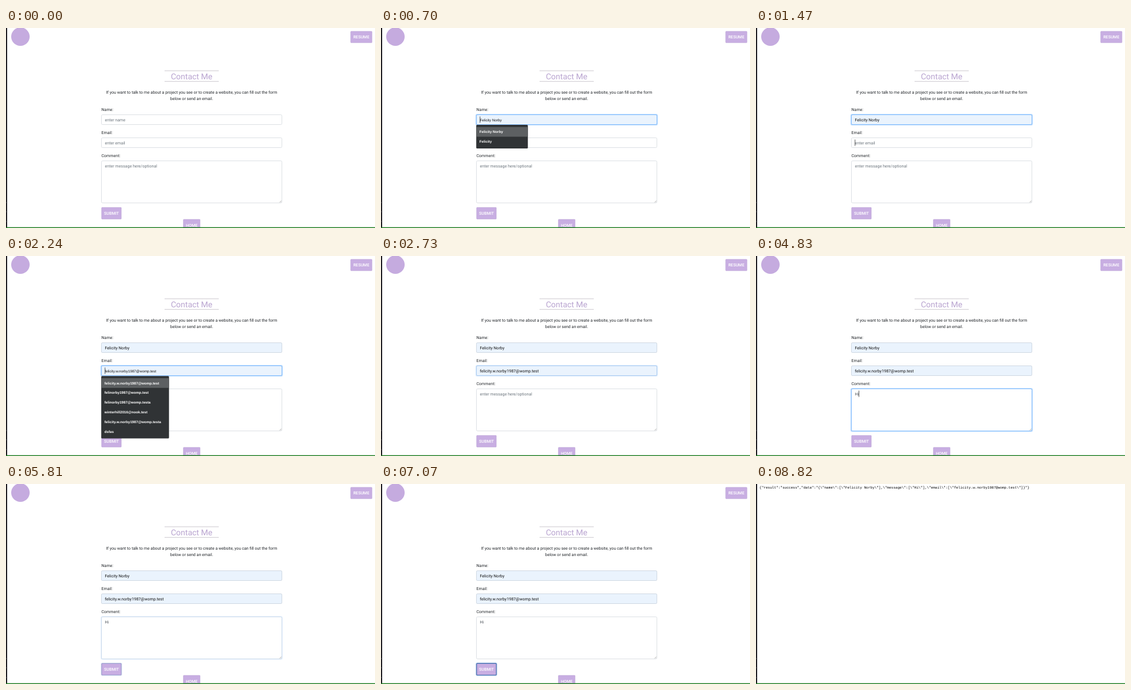
An HTML page for the animation above (9520 ms loop, 640x347 px).

```html
<!DOCTYPE html>
<html lang="en">
<head>
<meta charset="utf-8">
<title>Contact form</title>
<style>
  html, body { margin: 0; width: 100%; height: 100%; overflow: hidden; background: #fff; }
  svg { display: block; width: 640px; height: 347px; }
  text { font: 7.07px Roboto, sans-serif; fill: #212529; text-rendering: geometricPrecision; white-space: pre; }
  .mid { text-anchor: middle; }
  .title { font-size: 14px; fill: #b9a4d0; }
  .btn text { font-size: 7.15px; font-weight: 500; fill: #fff; text-anchor: middle; }
  .btn rect { fill: #c8aee2; stroke: #bda5d6; stroke-width: .6; }
  .hint { fill: #6c757d; }
  .typed { fill: #495057; }
  .plain { font-family: "Liberation Sans", Arial, sans-serif; font-size: 6.25px; fill: #111; }
  .menu text { font-family: "Liberation Sans", Arial, sans-serif; font-size: 6.2px; font-weight: bold; fill: #fff; }
  .json { font-family: "Liberation Mono", monospace; font-size: 6.05px; fill: #000; }
</style>
</head>
<body>
<svg id="stage" viewBox="0 0 640 347" xmlns="http://www.w3.org/2000/svg"></svg>
<script>
const LOOP = 9520, STEP = 70;
const NAME = "Felicity Norby";
const EMAIL = "felicity.w.norby1987@womp.test";
const stage = document.getElementById("stage");

function el(parent, tag, attrs, text) {
  const node = document.createElementNS(stage.namespaceURI, tag);
  for (const key in attrs) node.setAttribute(key, attrs[key]);
  if (text !== undefined) node.textContent = text;
  return parent.appendChild(node);
}
const group = (parent, cls = "") => el(parent, "g", { class: cls });
const label = (parent, x, y, text, cls = "") => el(parent, "text", { x, y, class: cls }, text);
const box = (parent, x, y, width, height, attrs) => el(parent, "rect", { x, y, width, height, ...attrs });
const show = (node, on) => node.setAttribute("display", on ? "inline" : "none");
const fade = (node, k) => node.setAttribute("opacity", k);

function button(x, y, w, h, text) {
  const g = group(page, "btn");
  box(g, x, y, w, h, { rx: 1 });
  label(g, x + w / 2, y + h / 2 + 2.6, text);
}

function field(y, h, caption, hint) {
  label(page, 165.5, y - 7, caption);
  const frame = { rx: 2, fill: "none" };
  box(page, 165.5, y, 313, h, { rx: 2, fill: "#fff", stroke: "#d3d8dd", "stroke-width": .8 });
  const filled = box(page, 165.5, y, 313, h, { rx: 2, fill: "#eaf3fd", stroke: "#cbd5e0", "stroke-width": .8 });
  const glow = group(page);
  box(glow, 164.8, y - .7, 314.4, h + 1.4, { ...frame, stroke: "#007bff", "stroke-opacity": .25, "stroke-width": 1.8 });
  box(glow, 165.5, y, 313, h, { ...frame, stroke: "#80bdff", "stroke-width": .9 });
  return {
    filled, glow,
    hint: label(page, 171.5, y + 11.5, hint, "hint"),
    preview: label(page, 171.5, y + 11.2, "", "plain"),
    value: label(page, 171.5, y + 11.5, "", "typed"),
    caret: box(page, 171.5, y + 3, .7, 11, { fill: "#111" })
  };
}

function menu(y, w, rows) {
  const g = group(stage, "menu");
  box(g, 165.2, y, w, rows.length * 16.8 + 7.4, { rx: 1.5, fill: "#303335" });
  const lit = box(g, 165.2, y + 3.8, w, 16.8, { fill: "#5d6062" });
  rows.forEach((row, i) => label(g, 170.8, y + 14.3 + i * 16.8, row));
  return { g, lit };
}

// Form page
const page = group(stage);
el(page, "circle", { cx: 25, cy: 15, r: 16, fill: "#c5abdf" });
button(597.8, 5.8, 37, 19.8, "RESUME");
for (const y of [73.8, 92.4]) box(page, 275, y, 94, .7, { fill: "#b5b0b9" });
label(page, 322, 88.8, "Contact Me", "title mid");
label(page, 322, 114, "If you want to talk to me about a project you see or to create a website, you can fill out the form", "mid");
label(page, 322, 125, "below or send an email.", "mid");
const name = field(150.5, 17, "Name:", "enter name");
const email = field(190.5, 17, "Email:", "enter email");
const note = field(230.5, 73, "Comment:", "enter message here/optional");
el(page, "path", { d: "M474.5 302.5l3-3M476.3 302.5l1.2-1.2", stroke: "#8a8a8a", "stroke-width": .6 });
button(165.8, 311.3, 34.2, 20.2, "SUBMIT");
button(307.6, 332, 29, 20, "HOME");
const ring = group(page);
box(ring, 164.9, 310.4, 36, 22, { rx: 1.6, fill: "none", stroke: "#9dbbe6", "stroke-width": .9 });
box(ring, 165.8, 311.3, 34.2, 20.2, { rx: 1, fill: "none", stroke: "#456fae", "stroke-width": 1.2 });

const nameMenu = menu(168, 89.5, [NAME, "Felicity"]);
const emailMenu = menu(208.2, 117.5, [
  EMAIL, "felinorby1987@womp.test", "felinorby1987@womp.testa",
  "winterhill2016@nook.test", EMAIL + "a", "dsfas"
]);

// Response page
const reply = label(stage, 6, 7.6,
  JSON.stringify({ result: "success", data: JSON.stringify({ name: [NAME], message: ["Hi"], email: [EMAIL] }) }), "json");

// Window edges
box(stage, 0, 0, 2, 347, { fill: "#1e1c22" });
for (const y of [302, 318, 335]) box(stage, 0, y, 1, 1.5, { fill: "#55525c" });
box(stage, 0, 345.6, 640, 1.4, { fill: "#1b7a1e" });

function setText(f, text, color) {
  f.value.textContent = text;
  f.value.style.fill = color;
}

function draw(ms) {
  const t = Math.floor(ms / STEP) * STEP;
  const within = (a, b) => t >= a && t < b;
  const ramp = (a, b) => Math.min(1, Math.max(0, (t - a) / (b - a)));

  show(page, t < 8750);
  show(reply, t >= 8820);

  fade(name.glow, ramp(70, 210) - ramp(1470, 1610));
  fade(name.filled, ramp(490, 700));
  show(name.hint, t < 560);
  name.preview.textContent = within(560, 1050) ? NAME : "";
  setText(name, t >= 1050 ? NAME : "", "#111");
  show(name.caret, within(140, 1050));
  show(nameMenu.g, within(210, 1050));
  show(nameMenu.lit, t >= 560);

  fade(email.glow, ramp(1470, 1610) - ramp(2660, 2800));
  show(email.filled, t >= 1960);
  show(email.hint, t < 1960);
  email.preview.textContent = within(1960, 2310) ? EMAIL : "";
  setText(email, t >= 2310 ? EMAIL : "", "#111");
  show(email.caret, within(1470, 2310));
  show(emailMenu.g, within(1540, 2310));
  show(emailMenu.lit, t >= 1960);

  const typed = t < 4620 ? "" : t < 4830 ? "H" : "Hi";
  fade(note.glow, ramp(3080, 3290) - ramp(5600, 5880));
  show(note.filled, false);
  show(note.hint, !typed);
  setText(note, typed, "#495057");
  note.caret.setAttribute("x", [171.5, 176.5, 178.3][typed.length]);
  show(note.caret, within(3150, 3640) || within(4200, 5390));

  fade(ring, ramp(5670, 6090));
}

const start = performance.now();
function tick() {
  draw((performance.now() - start) % LOOP);
  requestAnimationFrame(tick);
}
tick();
</script>
</body>
</html>
```
